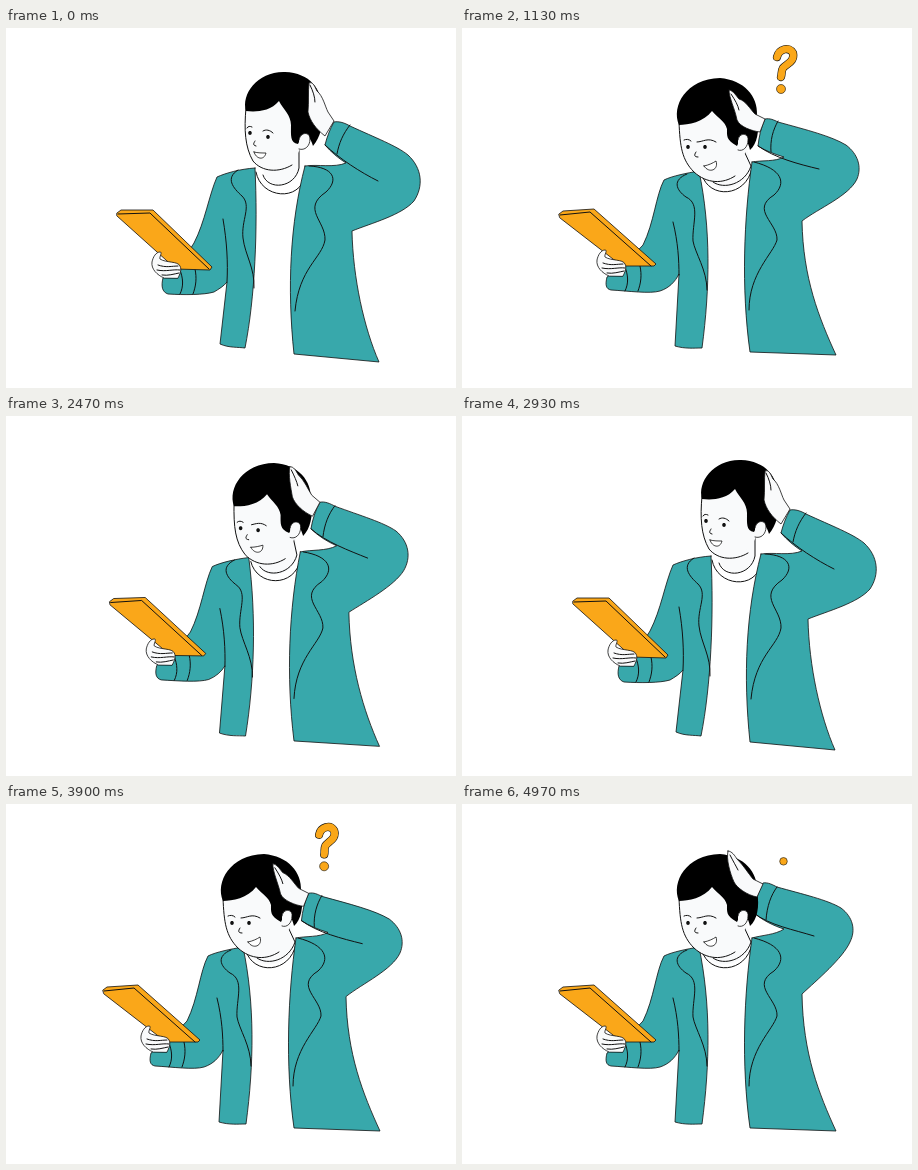
These frames come from a looping animation (450 px wide and 360 px high, 5 s). An HTML page:

```html
<!DOCTYPE html>
<html lang="en">
<head>
<meta charset="utf-8">
<title>Puzzled reader</title>
<style>
html, body { margin: 0; width: 100%; height: 100%; overflow: hidden; background: #fff; }
svg { display: block; width: 450px; height: 360px; }
path { stroke-linecap: round; stroke-linejoin: round; }
</style>
</head>
<body>
<svg id="stage" viewBox="0 0 450 360"></svg>
<script>
const LOOP = 5000, CYCLE = 3000;
const TEAL = '#38a8ab', ORANGE = '#faa719', INK = '#111', SKIN = '#f9fafb', WHITE = '#fff';
const stage = document.getElementById('stage');
const NUMBER = /-?\d+(\.\d+)?/g;
const numbers = d => d.match(NUMBER).map(Number);

function add(tag, attrs, parent = stage) {
  const el = document.createElementNS('http://www.w3.org/2000/svg', tag);
  for (const key in attrs) el.setAttribute(key, attrs[key]);
  return parent.appendChild(el);
}

// Each part has an upright pose, a leaning pose and optionally a leaning pose with the arm lowered.
// A pose may be a path or an [dx, dy] shift of the upright one.
const parts = [];
function part(fill, stroke, width, upright, lean, low) {
  const base = numbers(upright);
  const read = pose => Array.isArray(pose) ? base.map((v, i) => v + pose[i % 2]) : numbers(pose);
  const leaning = read(lean);
  parts.push({
    el: add('path', { fill, stroke, 'stroke-width': width }),
    d: upright, base, leaning, low: low ? read(low) : leaning
  });
}
const shape = (fill, ...poses) => part(fill, INK, 0.8, ...poses);
const flat = (fill, ...poses) => part(fill, 'none', 0, ...poses);
const line = (...poses) => part('none', INK, 1, ...poses);

// Neck and collar
flat(SKIN, 'M257 136C255 162 291 163 293 140L295 116L262 122Z',
  'M241 144C246 168 285 166 290 136L284 118L250 130Z');
line('M257 147C262 163 289 160 293 140L293 121', 'M251 154C262 162 283 156 289 138L282 123');
line('M250 144C255 171 294 174 299 148', 'M240 147C247 171 284 170 290 140');

// Left sleeve and front panel
shape(TEAL, 'M249 140C234 141 220 145 211 149C203 167 199 194 188 215L172 240L157 250C155 258 156 264 162 266C178 267 198 267 208 264C213 261 218 258 221 254L214 316C223 320 232 319 239 320C249 270 252 200 249 140Z',
  'M237 143C225 145 210 148 202 152C194 167 192 195 181 217L161 238L145 249C143 257 144 261 149 262C167 263 188 266 198 263C207 260 213 254 217 246L213 318C223 321 232 320 240 320C248 260 249 200 237 143Z');
line('M217 191C221 214 222 235 221 254', 'M211 194C216 214 217 232 217 247');
line('M232 142C219 150 227 160 236 168C246 178 235 192 237 210C239 227 249 240 248 260',
  'M225 146C210 152 214 162 224 169C239 176 230 195 231 213C233 225 245 242 245 262');
line('M174 242C177 250 178 258 174 266', [-11, -3]);
line('M189 241C191 250 190 258 187 266', [-11, -3]);

// Right front panel and raised arm
shape(TEAL, 'M299 138C312 136 328 140 340 135C332 130 325 124 319 117C321 109 324 101 328 94C333 93 339 95 344 98C370 110 391 118 402 127C416 140 418 158 408 173C396 187 366 195 346 203C347 250 358 300 373 334L288 326C281 260 284 195 299 138Z',
  'M290 134C300 131 313 131 322 125C312 122 300 116 292 109C293 99 296 88 301 79C306 78 311 81 315 83C340 90 366 96 379 104C391 113 394 126 388 138C381 154 355 176 340 190C341 250 357 290 374 327L288 324C279 260 282 190 290 134Z',
  'M290 134C300 132 313 134 322 129C312 126 304 123 296 118C297 109 299 99 303 91C308 90 312 92 316 94C345 102 369 108 384 117C396 126 400 139 395 151C387 168 357 180 340 193C341 250 357 290 374 327L288 324C279 260 282 190 290 134Z');
line('M319 117C334 131 354 144 372 153', 'M292 109C306 121 333 126 352 132', 'M296 118C313 130 336 136 357 141');
line('M344 97C337 106 333 115 331 126', 'M315 83C309 91 305 102 304 116', 'M316 93C311 102 308 112 309 124');
line('M303 138C328 139 333 152 320 164C295 181 320 193 319 212C316 230 293 240 289 283',
  'M292 134C320 141 325 155 312 167C288 182 316 195 315 212C311 226 287 245 287 282');

// Tablet and the hand that holds it
shape(ORANGE, 'M111 185L115 182L147 182L206 239L204 242L170 241L111 188Z',
  'M97 186L101 183L132 181L194 236L192 238L160 238L98 190Z');
line('M112 186L144 185L203 241', 'M98 187L128 184L189 238');
shape(SKIN, 'M158 250C151 247 145 241 146 234C147 229 150 224 154 224C157 224 153 229 154 231C160 235 172 233 174 238C176 242 174 246 172 250Z', [-11, -2]);
line('M152 237C160 240 166 238 172 238M151 242C160 244 167 241 174 242M156 247C162 248 168 246 173 245', [-11, -2]);

// Head
flat(SKIN, 'M240 78C238 102 239 119 247 133C258 147 285 143 294 121L300 76L270 58Z',
  'M217 94C218 119 220 132 232 144C248 159 270 155 283 125L283 85L255 66Z');
line('M240 80C238 102 239 119 247 133C256 144 273 145 286 137', 'M217 94C218 119 220 132 232 144C245 156 261 156 273 148');
flat('#000', 'M240 83C235 66 252 43 279 44C304 45 316 61 316 81C318 97 314 110 307 118C303 104 297 106 292 116C284 115 285 107 285 97C285 87 277 81 273 73C264 84 249 84 240 83Z',
  'M217 97C209 78 224 51 258 50C282 52 296 68 295 87C298 103 295 116 288 122C284 106 280 108 275 118C264 112 265 108 265 101C263 93 256 90 250 83C242 94 226 97 217 97Z');
shape(SKIN, 'M293 112C294 104 304 103 304 111C304 118 299 123 293 121', 'M276 112C277 104 287 105 286 112C286 119 281 124 276 122');
const eye = (x, y) => `M${x - 1.8} ${y}C${x - 1.8} ${y - 2.6} ${x + 1.8} ${y - 2.6} ${x + 1.8} ${y}C${x + 1.8} ${y + 2.6} ${x - 1.8} ${y + 2.6} ${x - 1.8} ${y}Z`;
flat(INK, eye(244, 105), eye(226, 119));
flat(INK, eye(262, 109), eye(243, 119));
line('M241 100C242 98 244 98 246 99M257 103C260 101 264 102 267 105',
  'M222 112C224 111 227 111 229 113M235 114C241 114 246 109 254 114');
line('M249 113C248 115 246 117 250 118', 'M234 124C232 127 232 129 236 129');
shape(WHITE, 'M248 124C252 125 256 125 260 125C258 133 250 131 248 124Z',
  'M242 138C247 137 251 135 254 133C257 142 247 146 242 138Z');

// Hand on the hair
shape(SKIN, 'M303 55C307 53 309 59 311 63C317 68 319 78 322 84L328 93L319 108C310 101 304 93 302 84C303 74 302 64 303 55Z',
  'M266 47C270 47 273 52 275 55C282 62 286 69 291 75L301 80L295 93C285 91 275 84 272 78C268 69 264 55 266 47Z',
  'M267 62C271 62 275 69 277 71C284 73 288 81 293 86L303 91L298 104C290 103 278 99 275 92C273 81 267 70 267 62Z');
line('M304 57C307 63 309 69 309 74', 'M268 51C271 57 274 62 276 66', 'M269 66C273 72 276 77 277 82');

// Question mark
const HOOK = 'M-11 -29C-11 -36 -5 -38 -1 -34C5 -28 -4 -23 -3 -18C-2 -14 0 -14 1 -11';
const HOOK_FROM = numbers(HOOK);
const HOOK_TO = numbers('M-4 -32C-2 -40 8 -43 12 -36C14 -27 5 -25 2 -21C0 -18 1 -15 0 -12');
const mark = add('g', {});
const hook = add('g', { fill: 'none' }, mark);
const hookPaths = [[INK, 8.2], [ORANGE, 7]].map(([stroke, width]) =>
  add('path', { stroke, 'stroke-width': width }, hook));
const dot = add('circle', { fill: ORANGE, stroke: INK, 'stroke-width': 0.6 }, mark);

function track(time, ...keys) {
  const next = keys.findIndex(key => key[0] > time);
  if (next === 0) return keys[0][1];
  if (next < 0) return keys[keys.length - 1][1];
  const [t0, v0] = keys[next - 1], [t1, v1] = keys[next];
  return v0 + (v1 - v0) * (time - t0) / (t1 - t0);
}

function withNumbers(d, value) {
  let i = 0;
  return d.replace(NUMBER, () => value(i++).toFixed(2));
}

function draw(time) {
  const t = time % LOOP % CYCLE;
  const lean = track(t, [0, 0], [70, .07], [200, .5], [330, .76], [530, .9], [750, 1],
    [2050, 1], [2200, .95], [2450, .55], [2700, .2], [2900, 0]);
  const low = track(t, [530, 0], [800, .7], [1000, 1], [1450, 1], [1600, .5], [1800, .15], [1930, 0]);
  for (const { el, d, base, leaning, low: lowered } of parts) {
    el.setAttribute('d', withNumbers(d, i =>
      base[i] + (leaning[i] - base[i]) * lean + (lowered[i] - leaning[i]) * low));
  }

  const turn = track(t, [530, 0], [770, .65], [1000, 1]);
  const x = track(t, [530, 311], [770, 317], [1000, 319], [1600, 319], [1930, 321.5]);
  const y = track(t, [530, 69], [770, 64], [1000, 61], [1600, 61], [1930, 58], [2050, 56], [2280, 34]);
  const size = track(t, [330, 0], [480, 1], [1970, 1], [2280, 0]);
  const hookSize = track(t, [1620, 1], [1790, 0]);
  mark.setAttribute('visibility', size > 0 ? 'visible' : 'hidden');
  mark.setAttribute('transform', `translate(${x} ${y}) scale(${size})`);
  hook.setAttribute('visibility', size * hookSize > 0 ? 'inherit' : 'hidden');
  hook.setAttribute('transform', `scale(${hookSize})`);
  dot.setAttribute('r', track(t, [1600, 4.5], [1930, 3.8]));
  const d = withNumbers(HOOK, i => HOOK_FROM[i] + (HOOK_TO[i] - HOOK_FROM[i]) * turn);
  for (const path of hookPaths) path.setAttribute('d', d);
}

const start = performance.now();
function tick() {
  draw(performance.now() - start);
  requestAnimationFrame(tick);
}
tick();
</script>
</body>
</html>
```
